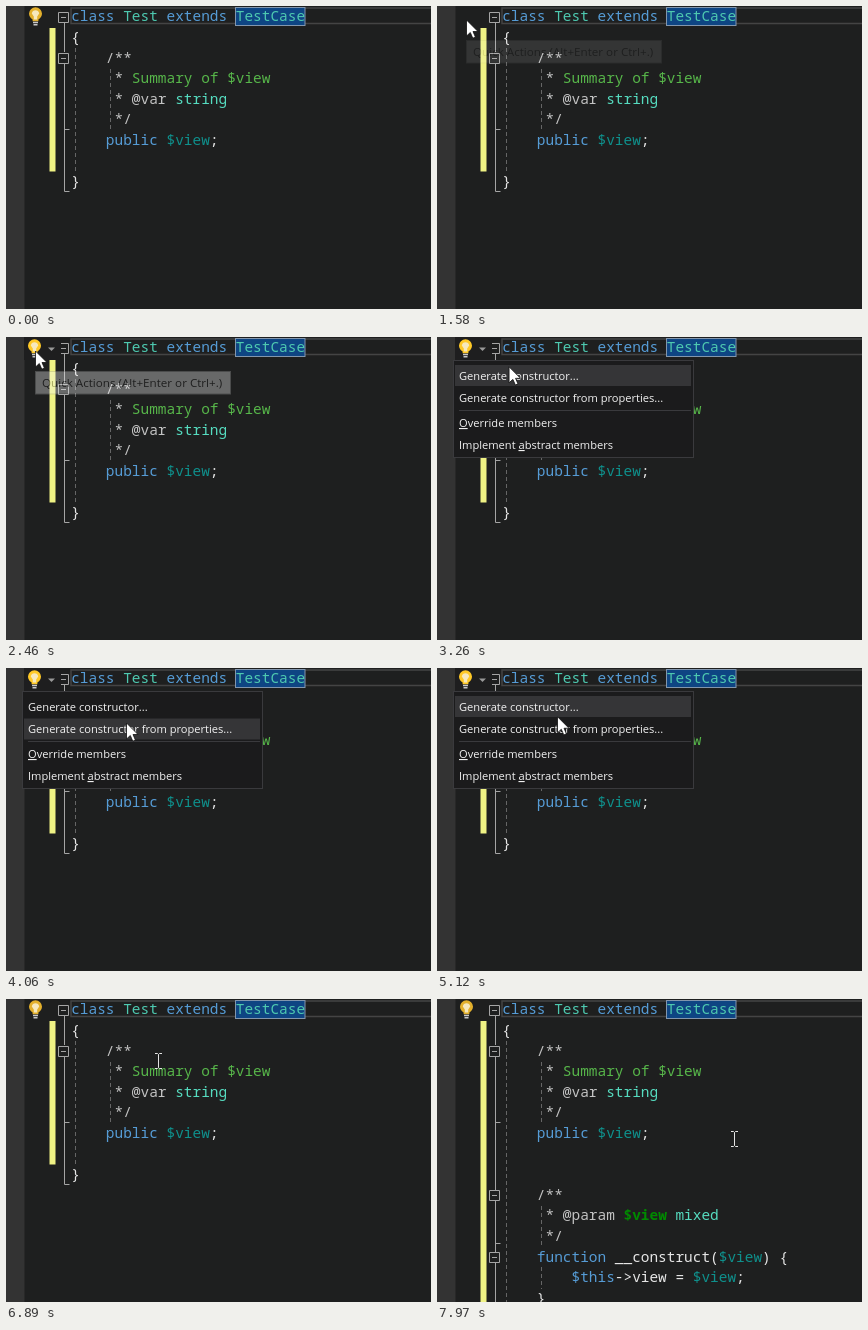
Recreate the animation shown at these times as an HTML page. Size 425 px wide and 303 px high, loop 8000 ms.

```html
<!DOCTYPE html>
<html lang="en">
<head>
<meta charset="utf-8">
<title>Generate constructor</title>
<style>
html, body { margin: 0; width: 100%; height: 100%; overflow: hidden; background: #1e1f1f; }
svg { display: block; }
text { white-space: pre; }
.code text { font: 500 14.44px "Noto Sans Mono", monospace; }
.ui text { font: 11.12px "Open Sans", sans-serif; fill: #f1f1f1; }
.ui .tip text { font-size: 11.65px; fill: #1e1e1e; }
.keyword { fill: #569cd6; }
.type { fill: #4ec9b0; }
.doctype { fill: #56dcc0; }
.plain { fill: #e6e6e6; }
.doc { fill: #c3c3c3; }
.summary { fill: #57b64a; }
.variable { fill: #0f908c; }
.code .param { fill: #008a00; font-weight: bold; }
.fold { fill: none; stroke: #a5a5a5; }
.guide { fill: none; stroke: #666; stroke-dasharray: 4 3; }
.u { text-decoration: underline; }
</style>
</head>
<body>
<svg id="stage" width="425" height="303" viewBox="0 0 425 303">
  <rect width="425" height="303" fill="#1e1f1f"/>
  <rect width="18.5" height="303" fill="#333"/>
  <rect x="65" y="2" width="400" height="15.5" fill="none" stroke="#444" stroke-width="1.5"/>
  <rect id="reference" x="229.5" y="1.5" width="69.5" height="18" fill="#0e4583" stroke="#8296ad"/>
  <rect id="changes" x="43.5" y="22" width="6" fill="#eff284"/>
  <g id="guides"></g>
  <g id="folds"></g>
  <g id="code" class="code"></g>
  <g class="ui">
    <rect id="button" x="18" y="0" width="37" height="23" fill="#1e1e1f"/>
    <g id="bulb">
      <path id="glass" d="M26.6 15.2V13.6Q23 11 23 7.6A6.5 6.3 0 0 1 36 7.6Q36 11 32.4 13.6V15.2Z"/>
      <path d="M27.8 13.5V10.4L25.8 7.4A3.8 4 0 0 1 33.2 7.4L31.2 10.4V13.5Z" fill="#f6e8bd"/>
      <path d="M27 16.5H32M27.5 18.7H31.5" stroke="#c8c8c8" stroke-width="1.5"/>
    </g>
    <path id="dropdown" d="M42 10.5H49L45.5 14Z" fill="#999"/>
    <g id="tip" class="tip">
      <rect x="29.5" y="34.5" width="195" height="22.5" fill="#f3f3f3" stroke="#a0a0a0"/>
      <text x="36" y="50">Quick Actions (Alt+Enter or Ctrl+.)</text>
    </g>
    <g id="menu">
      <rect x="16.5" y="23.5" width="240" height="97" fill="#1b1b1c" stroke="#3a3a3d"/>
      <rect id="hover" x="18" width="236" height="21" fill="#353537"/>
      <path d="M22 73.5H254" stroke="#3a3a3d"/>
      <text x="22" y="43">Generate constructor...</text>
      <text x="22" y="65">Generate constructor from properties...</text>
      <text x="22" y="90"><tspan class="u">O</tspan>verride members</text>
      <text x="22" y="112">Implement <tspan class="u">a</tspan>bstract members</text>
    </g>
  </g>
  <path id="arrow" d="M0 0V16L3.8 12.5L6.3 18.2L8.9 17L6.5 11.5H11.5Z" fill="#fff" stroke="#111" stroke-width=".8"/>
  <path id="beam" d="M-3.5 -7.5H-1L0 -6.5L1 -7.5H3.5M0 -6.5V6.5M-3.5 7.5H-1L0 6.5L1 7.5H3.5" fill="none" stroke="#e4e4e4"/>
</svg>
<script>
const LOOP = 8000, LINE = 20.6, CHAR = 8.664;
const INSERTED = 6950, OUTLINED = 7230;
const $ = id => document.getElementById(id);
const show = (id, on) => $(id).setAttribute("display", on ? "inline" : "none");
const within = (t, a, b) => t >= a && t < b;

// Each line: column, then class/text pairs.
const head = [
  [0, "keyword", "class ", "type", "Test ", "keyword", "extends ", "type", "TestCase"],
  [0, "plain", "{"],
  [4, "doc", "/**"],
  [5, "doc", "* ", "summary", "Summary of $view"],
  [5, "doc", "* @var ", "doctype", "string"],
  [5, "doc", "*/"],
  [4, "keyword", "public ", "variable", "$view", "plain", ";"],
  []
];
const before = [...head, [0, "plain", "}"]];
const after = [...head, [],
  [4, "doc", "/**"],
  [5, "doc", "* @param ", "param", "$view", "doctype", " mixed"],
  [5, "doc", "*/"],
  [4, "keyword", "function ", "plain", "__construct(", "variable", "$view", "plain", ") {"],
  [8, "keyword", "$this", "plain", "->view = ", "variable", "$view", "plain", ";"],
  [4, "plain", "}"]
];

function lineMarkup([column, ...parts], row) {
  let spans = "";
  for (let i = 0; i < parts.length; i += 2)
    spans += `<tspan class="${parts[i]}">${parts[i + 1].replace(/>/g, "&gt;")}</tspan>`;
  return `<text x="${65.2 + (column || 0) * CHAR}" y="${15.3 + row * LINE}">${spans}</text>`;
}

const foldBox = y => `<path class="fold" d="M52.5 ${y - 5}h10v10h-10ZM55 ${y}h5"/>`;
const foldLine = (from, to, ticks) =>
  `<path class="fold" d="M58.5 ${from}V${to}${ticks.map(y => `M58.5 ${y}h5`).join("")}"/>`;
const guide = (x, from, to) => `<path class="guide" d="M${x} ${from}V${to}"/>`;

// 0: before the insertion, 1: code inserted, 2: outlining refreshed
const documents = [
  {
    lines: before, barEnd: 165.5,
    folds: foldBox(11.5) + foldLine(17, 46, []) + foldBox(52.5) + foldLine(58, 185.5, [123.5, 185.5]),
    guides: guide(69.5, 42, 165) + guide(104.5, 63, 124)
  },
  {
    lines: after, barEnd: 303,
    folds: foldBox(11.5) + foldLine(17, 303, []),
    guides: guide(69.5, 42, 303)
  },
  {
    lines: after, barEnd: 303,
    folds: foldBox(11.5) + foldLine(17, 46, []) + foldBox(52.5) + foldLine(58, 191, [123.5])
      + foldBox(196.5) + foldLine(202, 253, [244.5]) + foldBox(258.5) + foldLine(264, 303, []),
    guides: guide(69.5, 42, 303) + guide(104.5, 63, 124) + guide(104.5, 207, 248) + guide(104.5, 268, 290)
  }
];

let shown = -1;
function showDocument(index) {
  if (index === shown) return;
  shown = index;
  const doc = documents[index];
  $("code").innerHTML = doc.lines.map(lineMarkup).join("");
  $("folds").innerHTML = doc.folds;
  $("guides").innerHTML = doc.guides;
  $("changes").setAttribute("height", doc.barEnd - 22);
}

// Pointer moves: first step, last step, step count, destination.
const moves = [
  [960, 1440, 10, 29.5, 14],
  [3020, 3400, 9, 90, 36.5],
  [3780, 4060, 7, 120.5, 55],
  [4750, 4850, 2, 120.5, 51.5],
  [5120, 5180, 2, 120.5, 46],
  [5650, 5730, 3, 128.5, 53],
  [5780, 5830, 2, 152.5, 62],
  [7460, 7970, 11, 297.5, 140]
];
const ease = p => (p + p * p * (3 - 2 * p)) / 2;

function pointer(t) {
  let x = 8.5, y = 29;
  for (const [start, end, count, toX, toY] of moves) {
    if (t < start) break;
    const step = Math.min(count, 1 + Math.floor((t - start) / (end - start) * (count - 1) + 1e-6));
    const p = ease(step / count);
    x += (toX - x) * p;
    y += (toY - y) * p;
  }
  return [x, y];
}

const tipSteps = [[1580, .1], [1620, .35], [1670, .7], [1720, 1], [2370, .75], [2410, .55], [2460, .35], [2510, 0]];
const tipOpacity = t => tipSteps.reduce((value, [at, next]) => t >= at ? next : value, 0);

function render(t) {
  const [x, y] = pointer(t);
  const beam = t >= 6310;
  const hot = within(t, 1620, 6310);

  showDocument(t < INSERTED ? 0 : t < OUTLINED ? 1 : 2);
  show("reference", !within(t, 6310, 6380));
  show("button", hot);
  show("dropdown", hot);
  show("bulb", !within(t, 1580, 1620) && !within(t, 6380, 6890) && !within(t, INSERTED, 7660));
  $("bulb").setAttribute("transform", `translate(${hot ? -1 : 0} ${hot ? 1 : 0})`);
  $("glass").setAttribute("fill", hot ? "#ffc927" : "#e3b02c");
  $("tip").setAttribute("opacity", tipOpacity(t));
  show("menu", within(t, 2510, 6240));
  $("hover").setAttribute("y", y < 50 ? 28 : 50.5);

  show("arrow", t >= 960 && !beam);
  show("beam", beam);
  $(beam ? "beam" : "arrow").setAttribute("transform", `translate(${x} ${y})`);
}

const origin = performance.now();
function frame() {
  render((performance.now() - origin) % LOOP);
  requestAnimationFrame(frame);
}
frame();
</script>
</body>
</html>
```
